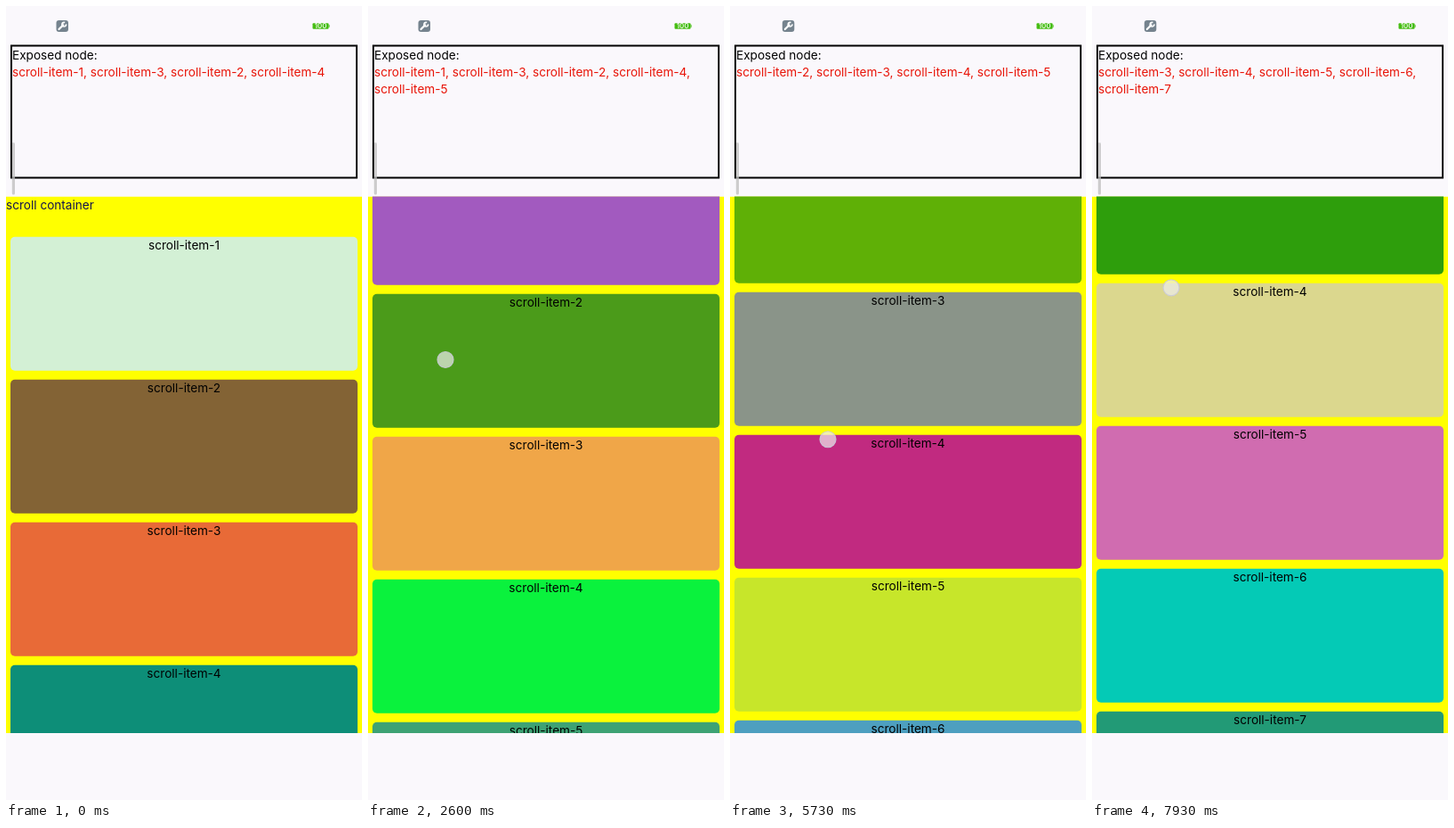
Animation of 400 by 890 pixels, one loop 8 s. Source, as an HTML page:

```html
<!DOCTYPE html>
<html lang="en">
<head>
<meta charset="utf-8">
<title>Exposed nodes while scrolling</title>
<style>
  html, body { margin: 0; width: 100%; height: 100%; overflow: hidden; background: #faf8fc; }
  svg { display: block; width: 400px; height: 890px; }
  text { font: 13.6px Inter, Roboto, sans-serif; white-space: pre; }
</style>
</head>
<body>
<svg viewBox="0 0 400 890">
  <defs><clipPath id="view"><rect y="213.5" width="400" height="601.5"/></clipPath></defs>
  <rect width="400" height="890" fill="#faf8fc"/>

  <g id="wrench">
    <rect x="56.5" y="16" width="13.5" height="13" rx="3" fill="#75838e"/>
    <path d="M59.5 26 L64.3 21.3" stroke="#fff" stroke-width="2.2" stroke-linecap="round"/>
    <path d="M66.2 18.6 A2.3 2.3 0 1 0 67.5 20.3" fill="none" stroke="#fff" stroke-width="1.7"/>
  </g>
  <rect x="344.5" y="19.3" width="18" height="6.4" rx="1" fill="#45bd12"/>
  <rect x="362.5" y="21" width="1" height="3" fill="#45bd12"/>
  <text x="353.5" y="25.4" text-anchor="middle" fill="#fff" style="font-size:8px;font-weight:500">100</text>

  <rect x="6" y="44.5" width="388" height="148" fill="none" stroke="#000" stroke-width="2"/>
  <text x="7" y="60.3">Exposed node:</text>
  <text id="line1" x="7" y="78.9" fill="#e81408"></text>
  <text id="line2" x="7" y="97.5" fill="#e81408"></text>
  <rect x="6.8" y="153" width="3.2" height="58.5" rx="1.5" fill="#bdbdbd" opacity=".75"/>

  <g clip-path="url(#view)">
    <rect y="213.5" width="400" height="601.5" fill="#ff0"/>
    <g id="content"><text x="0" y="228.3" fill="#14144e">scroll container</text></g>
  </g>
  <circle id="touch" r="9" fill="#ececec" fill-opacity=".7" stroke="#cacad8" stroke-opacity=".9" stroke-width="1.2"/>
</svg>
<script>
const LOOP = 8000, FRAME = 1000 / 15;
const $ = id => document.getElementById(id);

// [time, scroll offset]
const scrollKeys = [[0, 0], [900, 0], [1800, 44], [2600, 96], [4400, 192.3], [4650, 206],
  [5260, 206], [5733, 258], [6400, 335], [7933, 428], [LOOP, 432]];

// Each drag: visible span, y + offset, and [offset, x] keys
const drags = [
  { from: 860, to: 4680, base: 492.5, xs: [[0, 98], [44, 93], [96, 87], [192, 77], [210, 75]] },
  { from: 5180, to: LOOP, base: 743.8, xs: [[206, 114], [258, 110], [335, 97], [428, 89], [440, 88]] }
];

// Exposed items, first coloured item and its colours
const states = [
  { at: 0, exposed: [1, 3, 2, 4], first: 1, colors: ['#d3f0d5', '#836335', '#e86a37', '#0d8e78', '#7a9c64'] },
  { at: 2490, exposed: [1, 3, 2, 4, 5], first: 1, colors: ['#a25abf', '#4b9b1a', '#f0a648', '#0af23d', '#3ea274'] },
  { at: 4520, exposed: [2, 3, 4, 5], first: 2, colors: ['#5fb006', '#8a9489', '#c12a80', '#c7e62a', '#4d9fc0'] },
  { at: 5790, exposed: [2, 3, 4, 5, 6], first: 2, colors: ['#9a2c1a', '#dc1608', '#64ca74', '#4f1eae', '#a80d05'] },
  { at: 6790, exposed: [3, 4, 5, 6], first: 3, colors: ['#b08a4c', '#5f9ab0', '#a8bd60', '#9a6a90', '#6a9a80'] },
  { at: 7590, exposed: [3, 4, 5, 6, 7], first: 3, colors: ['#2e9e0c', '#dbd78e', '#d06cb0', '#04cab6', '#229a76'] }
];

const make = (tag, attrs) => {
  const el = document.createElementNS('http://www.w3.org/2000/svg', tag);
  for (const key in attrs) el.setAttribute(key, attrs[key]);
  return $('content').appendChild(el);
};
const items = Array.from({ length: 7 }, (_, i) => {
  const y = 258.8 + 160 * i;
  const box = make('rect', { x: 5, y, width: 390, height: 150, rx: 5 });
  make('text', { x: 200, y: y + 14.4, 'text-anchor': 'middle' }).textContent = 'scroll-item-' + (i + 1);
  return box;
});

function lerpKeys(keys, at) {
  const i = Math.max(1, keys.findIndex(k => k[0] >= at));
  const [a, va] = keys[i - 1], [b, vb] = keys[i];
  return va + (vb - va) * (at - a) / (b - a);
}

let shown;
function showState(state) {
  if (state === shown) return;
  shown = state;
  const names = state.exposed.map(n => 'scroll-item-' + n);
  $('line1').textContent = names.slice(0, 4).join(', ') + (names.length > 4 ? ',' : '');
  $('line2').textContent = names[4] || '';
  items.forEach((box, i) => box.setAttribute('fill', state.colors[i + 1 - state.first] || '#888'));
}

function draw(t) {
  const offset = lerpKeys(scrollKeys, t);
  $('content').setAttribute('transform', `translate(0 ${-offset})`);
  showState(states.filter(s => s.at <= t).pop());
  $('wrench').setAttribute('transform', `translate(${t < 3400 ? 0 : 2.3} 0)`);

  const drag = drags.find(d => t >= d.from && t < d.to);
  $('touch').style.display = drag ? '' : 'none';
  if (drag) {
    $('touch').setAttribute('cx', lerpKeys(drag.xs, offset));
    $('touch').setAttribute('cy', drag.base - offset);
  }
}

const start = performance.now();
function tick() {
  const t = (performance.now() - start) % LOOP;
  draw(Math.min(Math.floor((t + 5) / FRAME), 119) * FRAME);
  requestAnimationFrame(tick);
}
tick();
</script>
</body>
</html>
```
